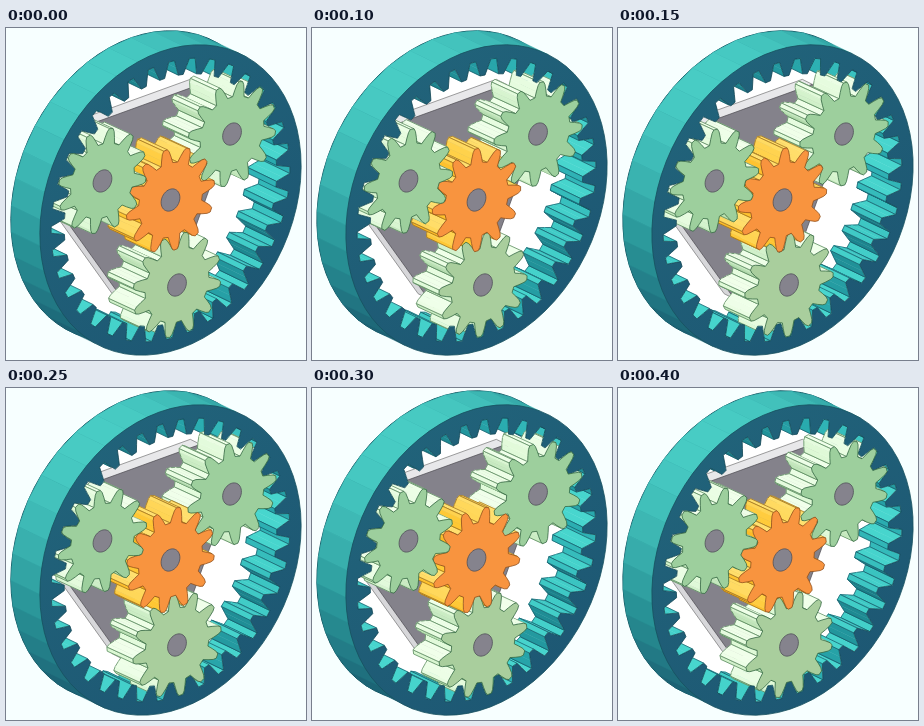
Animation of 300x332 px, one loop 450 ms. Source, as an HTML page with a canvas:

```html
<!DOCTYPE html>
<html lang="en">
<head>
<meta charset="utf-8">
<title>Planetary gear</title>
<style>
  html, body { margin: 0; width: 100%; height: 100%; overflow: hidden; background: #f7ffff; }
  canvas { display: block; width: 300px; height: 332px; }
</style>
</head>
<body>
<canvas id="stage"></canvas>
<script>
const canvas = document.getElementById('stage');
const ctx = canvas.getContext('2d');
const ratio = window.devicePixelRatio || 1;
canvas.width = 300 * ratio;
canvas.height = 332 * ratio;

const STEP = 50, STEPS = 9, TAU = Math.PI * 2, DEG = TAU / 360;

// Oblique view: unit vectors of the gear plane (1 = planet orbit) and the depth.
const ORIGIN = [164.5, 172], U = [74.8, -27.1], V = [6.5, 85];
const RING_DEPTH = [-29, -14], GEAR_DEPTH = [-26, -12], PLATE_DEPTH = [-10, -5];
const RING_RADIUS = 1.74;

const polar = (r, a) => [r * Math.cos(a), r * Math.sin(a)];
const add = (p, q) => [p[0] + q[0], p[1] + q[1]];
const cross = (p, q) => p[0] * q[1] - p[1] * q[0];
const project = ([x, y]) => [
  ORIGIN[0] + x * U[0] + y * V[0],
  ORIGIN[1] + x * U[1] + y * V[1]
];

const PLANETS = [90, 330, 210].map(a => polar(1, a * DEG));

// Half tooth outline as [share of the pitch, radius], mirrored for the other flank.
const GEAR_TOOTH = [[-.35, .425], [-.25, .49], [-.16, .555], [-.08, .588]];
const RING_TOOTH = [[-.36, 1.59], [-.25, 1.5], [-.13, 1.415]];

function toothed(count, half, phase, center = [0, 0]) {
  const tooth = [...half, ...half.map(([f, r]) => [-f, r]).reverse()];
  const points = [];
  for (let i = 0; i < count; i++)
    for (const [f, r] of tooth)
      points.push(add(center, polar(r, (i + f) * TAU / count + phase)));
  return points;
}

const circle = (r, n, phase = 0, center = [0, 0]) =>
  Array.from({ length: n }, (_, i) => add(center, polar(r, i * TAU / n + phase)));

function trace(path, points) {
  points.forEach((p, i) => i ? path.lineTo(...p) : path.moveTo(...p));
  path.closePath();
  return path;
}

const outline = points => trace(new Path2D(), points.map(project));

function paint(path, fill, line, width = 1) {
  ctx.fillStyle = fill;
  ctx.fill(path);
  ctx.strokeStyle = line;
  ctx.lineWidth = width;
  ctx.stroke(path);
}

function strokeLine(points, color, width) {
  ctx.beginPath();
  points.forEach(p => ctx.lineTo(...p));
  ctx.strokeStyle = color;
  ctx.lineWidth = width;
  ctx.stroke();
}

function ramp(stops, t) {
  const x = Math.min(.999, Math.max(0, t)) * (stops.length - 1);
  const i = Math.floor(x), k = x - i;
  return `rgb(${stops[i].map((c, j) => Math.round(c + (stops[i + 1][j] - c) * k))})`;
}

const GREEN = [[118, 168, 120], [184, 224, 178], [222, 249, 214], [240, 255, 234]];
const YELLOW = [[200, 122, 18], [252, 178, 30], [255, 200, 52], [255, 224, 112]];
const TEAL = [[18, 88, 104], [26, 126, 136], [42, 172, 176], [72, 214, 206]];
const RIM = [[26, 80, 104], [28, 98, 116], [40, 146, 150], [72, 204, 196]];
const PLATE = [[188, 188, 194], [222, 222, 225], [232, 232, 234]];

// Draws the visible walls between a face and its copy moved by depth.
// Lines appear on the far rim and on edges with a sharp turn.
function extrude(points, depth, colors, { hole = false, line, light = [-.3, -.95] }) {
  const sign = hole ? -1 : 1, n = points.length;
  const sides = points.map((p, i) => {
    const q = points[(i + 1) % n], len = Math.hypot(q[0] - p[0], q[1] - p[1]);
    const a = project(p), b = project(q);
    const dir = [(q[0] - p[0]) / len, (q[1] - p[1]) / len];
    return {
      a, b, dir,
      visible: cross([b[0] - a[0], b[1] - a[1]], depth) * sign < 0,
      order: (a[0] + b[0]) * depth[0] + (a[1] + b[1]) * depth[1],
      shade: .5 - .5 * sign * cross(light, [-dir[0], -dir[1]])
    };
  });
  const sharp = (s, t) => !t.visible || Math.abs(cross(s.dir, t.dir)) > .5;
  sides.forEach((s, i) => {
    s.sharpA = sharp(s, sides[(i + n - 1) % n]);
    s.sharpB = sharp(s, sides[(i + 1) % n]);
  });
  const walls = sides.filter(s => s.visible).sort((s, t) => s.order - t.order);
  for (const { a, b, shade, sharpA, sharpB } of walls) {
    const fill = ramp(colors, shade), farA = add(a, depth), farB = add(b, depth);
    paint(trace(new Path2D(), [a, b, farB, farA]), fill, fill, .5);
    if (!line) continue;
    strokeLine([farA, farB], line, .7);
    if (sharpA) strokeLine([a, farA], line, .7);
    if (sharpB) strokeLine([b, farB], line, .7);
  }
}

function drawCarrier() {
  const size = .42, corners = [];
  PLANETS.forEach((p, i) => {
    const before = PLANETS[(i + 2) % 3], after = PLANETS[(i + 1) % 3];
    corners.push(
      add(p, [-after[0] * size, -after[1] * size]),
      add(p, [-before[0] * size, -before[1] * size])
    );
  });
  // Keep the corners in order around the plate.
  corners.sort((p, q) => Math.atan2(p[1], p[0]) - Math.atan2(q[1], q[0]));
  ctx.save();
  ctx.translate(...RING_DEPTH);
  extrude(corners, PLATE_DEPTH, PLATE, { line: '#777' });
  paint(outline(corners), '#84828b', '#4b4a50', .7);
  ctx.restore();
}

function draw(step) {
  // The sun turns clockwise by one tooth per loop, planets and ring the other way.
  const sunPhase = (28.5 + 30 * step / STEPS) * DEG;
  const planetPhase = TAU / 24 - sunPhase;
  const ringPhase = TAU / 72 + planetPhase / 3;

  const planets = PLANETS.map((center, i) => ({
    center, points: toothed(12, GEAR_TOOTH, planetPhase, center),
    sides: GREEN, edge: '#4a7c50', face: i ? '#9dcf9d' : '#a9ce9d', rim: '#356943'
  }));
  const sun = {
    center: [0, 0], points: toothed(12, GEAR_TOOTH, sunPhase),
    sides: YELLOW, edge: '#96691b', face: '#f8943f', rim: '#92511c'
  };
  const gears = [planets[0], planets[1], sun, planets[2]];
  const hole = toothed(36, RING_TOOTH, ringPhase);
  const holePath = outline(hole);
  const rimPath = outline(circle(RING_RADIUS, 72, ringPhase));

  ctx.setTransform(ratio, 0, 0, ratio, 0, 0);
  ctx.lineJoin = 'round';
  ctx.fillStyle = '#f7ffff';
  ctx.fillRect(0, 0, 300, 332);

  ctx.save();
  ctx.translate(...RING_DEPTH);
  paint(rimPath, '#1c6f7c', '#12525e');
  ctx.restore();
  extrude(circle(RING_RADIUS, 36, ringPhase), RING_DEPTH, RIM, { light: [-.39, -.92] });

  const faceColor = ctx.createLinearGradient(70, 60, 260, 290);
  faceColor.addColorStop(0, '#21637a');
  faceColor.addColorStop(1, '#1d5773');
  paint(rimPath, faceColor, '#17515f', .8);

  ctx.save();
  ctx.clip(holePath);
  ctx.fillStyle = '#fff';
  ctx.fillRect(0, 0, 300, 332);
  extrude(hole, RING_DEPTH, TEAL, { hole: true, line: '#145463' });
  drawCarrier();
  for (const g of gears) extrude(g.points, GEAR_DEPTH, g.sides, { line: g.edge });
  ctx.restore();

  ctx.strokeStyle = '#114653';
  ctx.lineWidth = .8;
  ctx.stroke(holePath);

  for (const g of gears) {
    paint(outline(g.points), g.face, g.rim, .8);
    paint(outline(circle(.125, 40, 0, g.center)), '#85838d', '#505058', .8);
  }
}

const start = performance.now();
let shown = -1;
function tick() {
  const step = Math.floor((performance.now() - start) / STEP) % STEPS;
  if (step !== shown) draw(shown = step);
  requestAnimationFrame(tick);
}
tick();
</script>
</body>
</html>
```
